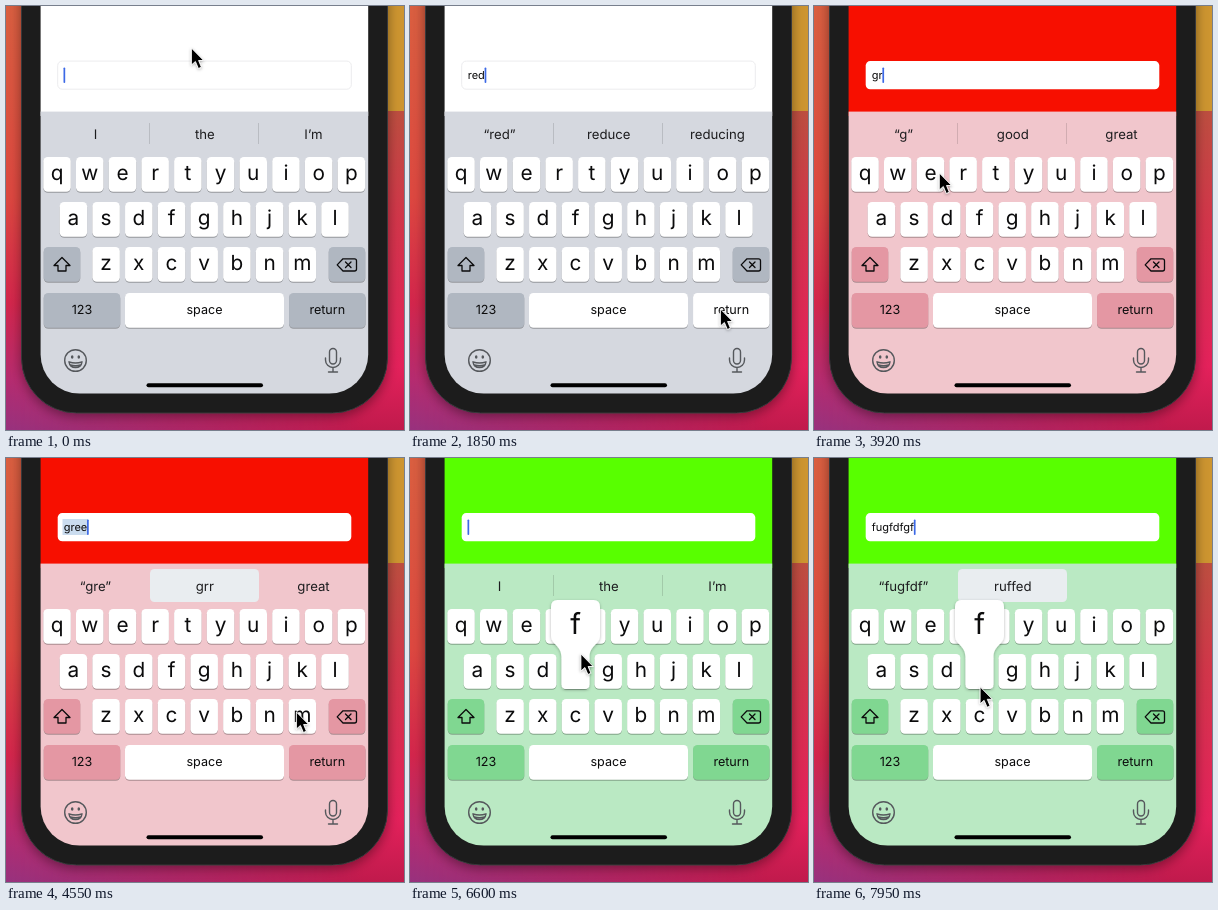
An HTML page for the animation above (8 s loop, 398 px wide and 424 px high).

```html
<!DOCTYPE html>
<html lang="en">
<head>
<meta charset="utf-8">
<title>Keyboard colours</title>
<style>
  html, body { margin: 0; width: 100%; height: 100%; overflow: hidden; }
  svg { display: block; width: 398px; height: 424px; font-family: Inter, Roboto, sans-serif; text-rendering: geometricPrecision; }
  text { fill: #0b0b0c; text-anchor: middle; white-space: pre; }
  .letter { font-size: 20.8px; }
  .label { font-size: 12.6px; }
  .hint { font-size: 13.2px; fill: #1c1c1e; }
  .icon { fill: none; stroke: #0b0b0c; stroke-width: 1.3; stroke-linejoin: round; stroke-linecap: round; }
  .soft { stroke: #55585c; stroke-width: 1.4; }
  #typed { font-size: 11px; text-anchor: start; }
  #popLetter { font-size: 29px; }
  #page { fill: var(--page); }
  #keyboard { fill: var(--board); }
  .special { fill: var(--special); }
  .special.down { fill: #fff; }
</style>
</head>
<body>
<svg id="stage" viewBox="0 0 398 424">
  <defs>
    <linearGradient id="left" x2="0" y2="1">
      <stop stop-color="#da5f40"/><stop offset=".45" stop-color="#dd4840"/>
      <stop offset=".7" stop-color="#d3264c"/><stop offset=".88" stop-color="#b52c70"/>
      <stop offset="1" stop-color="#98327e"/>
    </linearGradient>
    <linearGradient id="right" x2="0" y2="1">
      <stop offset=".25" stop-color="#bd4e40"/><stop offset=".5" stop-color="#d2364a"/>
      <stop offset=".85" stop-color="#e4215b"/><stop offset="1" stop-color="#c01a4c"/>
    </linearGradient>
    <linearGradient id="across">
      <stop stop-color="#000"/><stop offset=".9" stop-color="#fff"/>
    </linearGradient>
    <mask id="blend"><rect width="398" height="424" fill="url(#across)"/></mask>
    <filter id="glow" x="-20%" y="-20%" width="140%" height="140%">
      <feDropShadow dx="0" dy="3" stdDeviation="6" flood-opacity=".4"/>
    </filter>
    <filter id="lift" x="-30%" y="-30%" width="160%" height="160%">
      <feDropShadow dx="0" dy="1" stdDeviation="1.6" flood-opacity=".3"/>
    </filter>
    <clipPath id="glass"><rect x="34.6" y="-80" width="327.6" height="467.6" rx="39"/></clipPath>
  </defs>

  <rect width="398" height="424" fill="url(#left)"/>
  <rect width="398" height="424" fill="url(#right)" mask="url(#blend)"/>
  <rect x="199" width="199" height="105" fill="#cd9530"/>
  <rect x="15.5" y="-100" width="366" height="507" rx="55" fill="#1b1b1c" stroke="#39393b" filter="url(#glow)"/>

  <g clip-path="url(#glass)">
    <rect id="page" x="34" width="329" height="110"/>
    <rect id="keyboard" x="34" y="105.6" width="329" height="284"/>
  </g>

  <rect id="field" x="51.7" y="55.1" width="293.6" height="28.1" rx="4.5" fill="#fff"/>
  <rect id="mark" x="56.5" y="61" height="16" fill="#cadcef"/>
  <text id="typed" x="57.7" y="73.2"></text>
  <rect id="caret" y="61.5" width="1.7" height="15.5" rx=".8" fill="#3c69e6"/>

  <rect id="choice" x="144" y="111" width="109" height="33" rx="4.5" fill="#e9edf0"/>
  <path id="dividers" d="M143.5 117v21M252.5 117v21" stroke="#000" stroke-opacity=".13"/>
  <text class="hint" x="89.5" y="132.7"></text>
  <text class="hint" x="198.8" y="132.7"></text>
  <text class="hint" x="307.5" y="132.7"></text>

  <g id="keys"></g>

  <path class="icon" d="M56 251.5l-8 8h4v5.5h8v-5.5h4z"/>
  <path class="icon" d="M337 252.800h11.500q2 0 2 2v8.200q0 2-2 2H337l-5.800-6.100zM339.500 256l5.500 5.500M345 256l-5.500 5.500"/>
  <g class="icon soft">
    <circle cx="69.500" cy="354.500" r="10.800"/>
    <path d="M63 355.800q6.500 2.400 13 0-.8 5.700-6.500 5.700T63 355.800zM64.500 359q5 1.500 10 0"/>
    <ellipse cx="66.200" cy="351" rx=".6" ry="1" fill="#55585c"/>
    <ellipse cx="72.800" cy="351" rx=".6" ry="1" fill="#55585c"/>
    <rect x="323.500" y="342.500" width="7" height="15.500" rx="3.500"/>
    <path d="M319.500 352v2a7.500 7.500 0 0 0 15 0v-2M327 361.500v4.500M322.500 366h9"/>
  </g>
  <rect x="140.500" y="377.200" width="116.500" height="4" rx="2" fill="#000"/>

  <g id="popup" filter="url(#lift)">
    <path fill="#fff" d="M-18-54H18Q24.500-54 24.500-47V-19C24.500-9 14-9 14 3V30.500Q14 35 9.500 35H-9.500Q-14 35-14 30.500V3C-14-9-24.500-9-24.500-19V-47Q-24.500-54-18-54Z"/>
    <text id="popLetter" y="-20"></text>
  </g>
  <path id="pointer" d="M0 0V17L4 13.500 7 20.500 10 19.200 7.200 12.500H12.300Z" fill="#000" stroke="#fff" stroke-width=".9" filter="url(#lift)"/>
</svg>

<script>
const LOOP = 8000, STEP = 50, PITCH = 32.7, HINT_LAG = 300;
const $ = id => document.getElementById(id);
const keys = { return: { x: 305, y: 287 } };

function add(tag, attrs, text = '') {
  const node = document.createElementNS('http://www.w3.org/2000/svg', tag);
  for (const name in attrs) node.setAttribute(name, attrs[name]);
  node.textContent = text;
  return $('keys').appendChild(node);
}

function addKey(center, y, width, kind, label, size = 'label') {
  const x = center - width / 2;
  add('rect', { x, y: y + 1, width, height: 34.8, rx: 4.5, fill: '#000', 'fill-opacity': .3 });
  const face = add('rect', { x, y, width, height: 34.7, rx: 4.5, fill: '#fff', class: kind });
  add('text', { x: center, y: y + (size === 'letter' ? 22.7 : 21), class: size }, label);
  return face;
}

['qwertyuiop', 'asdfghjkl', 'zxcvbnm'].forEach((row, r) => {
  [...row].forEach((letter, i) => {
    const x = 198.2 + (i - (row.length - 1) / 2) * PITCH, y = 151 + r * 45;
    keys[letter] = { x, y };
    addKey(x, y, 27.5, '', letter, 'letter');
  });
});
addKey(56, 241, 36.5, 'special');
addKey(341, 241, 36.5, 'special');
addKey(76, 287, 76.5, 'special', '123');
addKey(198.5, 287, 159, '', 'space');
const returnKey = addKey(321.3, 287, 76.5, 'special', 'return');

// Presses at an even pace; the hand lands at y on the key and sinks a little with each one.
const press = (names, at, gap, { hold = 100, y = 16, sink = 0 } = {}) =>
  [...names].map((name, i) => {
    const down = at + i * gap, key = keys[name];
    return { name, down, up: down + hold, x: key.x + 6 - .6 * i, y: key.y + y + sink * i };
  });

const presses = [
  press('red', 650, 350),
  press(['return'], 1800, 0, { hold: 200 }),
  press('gree', 3400, 270),
  press('n', 4750, 0),
  press(['return'], 5150, 0, { hold: 200, y: 8 }),
  press('fugfdfgff', 6580, 170, { y: 0, sink: 4.1 })
].flat();
const letters = presses.filter(p => p.name !== 'return');
const returns = presses.filter(p => p.name === 'return');

const rests = [[0, 186, 42], [3150, 198, 226], [4550, 291, 254]];
const path = presses
  .flatMap(p => [[p.down, p.x, p.y], [p.up, p.x, p.y]])
  .concat(rests)
  .sort((a, b) => a[0] - b[0]);

const themes = {
  '': { page: '#fff', board: '#d5d8df', special: '#b0b7c1' },
  red: { page: '#f70f00', board: '#f1c6cc', special: '#e497a3' },
  green: { page: '#58ff00', board: '#bae9c3', special: '#80d791' }
};

const guesses = {
  r: ['are', 're'], re: ['really', 'red'], red: ['reduce', 'reducing'],
  g: ['good', 'great'], gr: ['great', 'group'], gre: ['grr', 'great'],
  gree: ['green', 'greet'], green: ['greenfield', 'greenhouse'],
  f: ['for', 'from'], fu: ['full', 'fun'], fug: ['fig', 'fugue'],
  fugf: ['fugue', ''], fugfd: ['fugue', ''], fugfdf: ['ruffed', '']
};
const corrections = ['gre', 'fugfdf'];

const show = (id, on) => $(id).setAttribute('visibility', on ? 'visible' : 'hidden');
const isDown = t => p => t >= p.down && t < p.up;
const clearedAt = t => Math.max(0, ...returns.map(p => p.down + 150).filter(c => c <= t));
const typedSince = (start, t) => letters.filter(p => p.up > start && p.up <= t);
const spell = list => list.map(p => p.name).join('');

function themeAt(t) {
  const sent = returns.filter(p => p.down + 100 <= t).pop();
  return themes[sent ? spell(typedSince(clearedAt(sent.down), sent.down)) : ''];
}

function pointerAt(t) {
  const i = Math.max(1, path.findIndex(p => p[0] >= t));
  const [t0, x0, y0] = path[i - 1], [t1, x1, y1] = path[i];
  const p = (t - t0) / (t1 - t0), ease = p * p * (3 - 2 * p);
  return [x0 + (x1 - x0) * ease - .6, y0 + (y1 - y0) * ease];
}

function drawText(t) {
  const start = clearedAt(t), done = typedSince(start, t);
  $('typed').textContent = spell(done);
  const width = done.length ? $('typed').getComputedTextLength() : 0;
  const lastEdit = done.length ? done[done.length - 1].up : start;
  $('caret').setAttribute('x', 57.5 + width);
  show('caret', (t - lastEdit) % 1000 < 600);

  const prefix = spell(typedSince(start, t - HINT_LAG));
  const words = prefix ? [`“${prefix}”`, ...guesses[prefix]] : ['I', 'the', 'I’m'];
  const chosen = corrections.includes(prefix);
  document.querySelectorAll('.hint').forEach((node, i) => node.textContent = words[i]);
  show('choice', chosen);
  show('dividers', !chosen);
  show('mark', chosen && words[2]);
  $('mark').setAttribute('width', width + 2);
}

function draw(t) {
  const theme = themeAt(t);
  for (const part in theme) $('stage').style.setProperty('--' + part, theme[part]);
  $('field').setAttribute('stroke', theme === themes[''] ? '#ececee' : 'none');
  drawText(t);

  const active = letters.find(isDown(t));
  show('popup', active);
  if (active) {
    const { x, y } = keys[active.name];
    $('popup').setAttribute('transform', `translate(${x} ${y})`);
    $('popLetter').textContent = active.name;
  }
  returnKey.classList.toggle('down', returns.some(isDown(t)));
  $('pointer').setAttribute('transform', `translate(${pointerAt(t)})`);
}

function tick() {
  const t = performance.now() % LOOP;
  draw(Math.floor(t / STEP) * STEP);
  requestAnimationFrame(tick);
}
tick();
</script>
</body>
</html>
```
